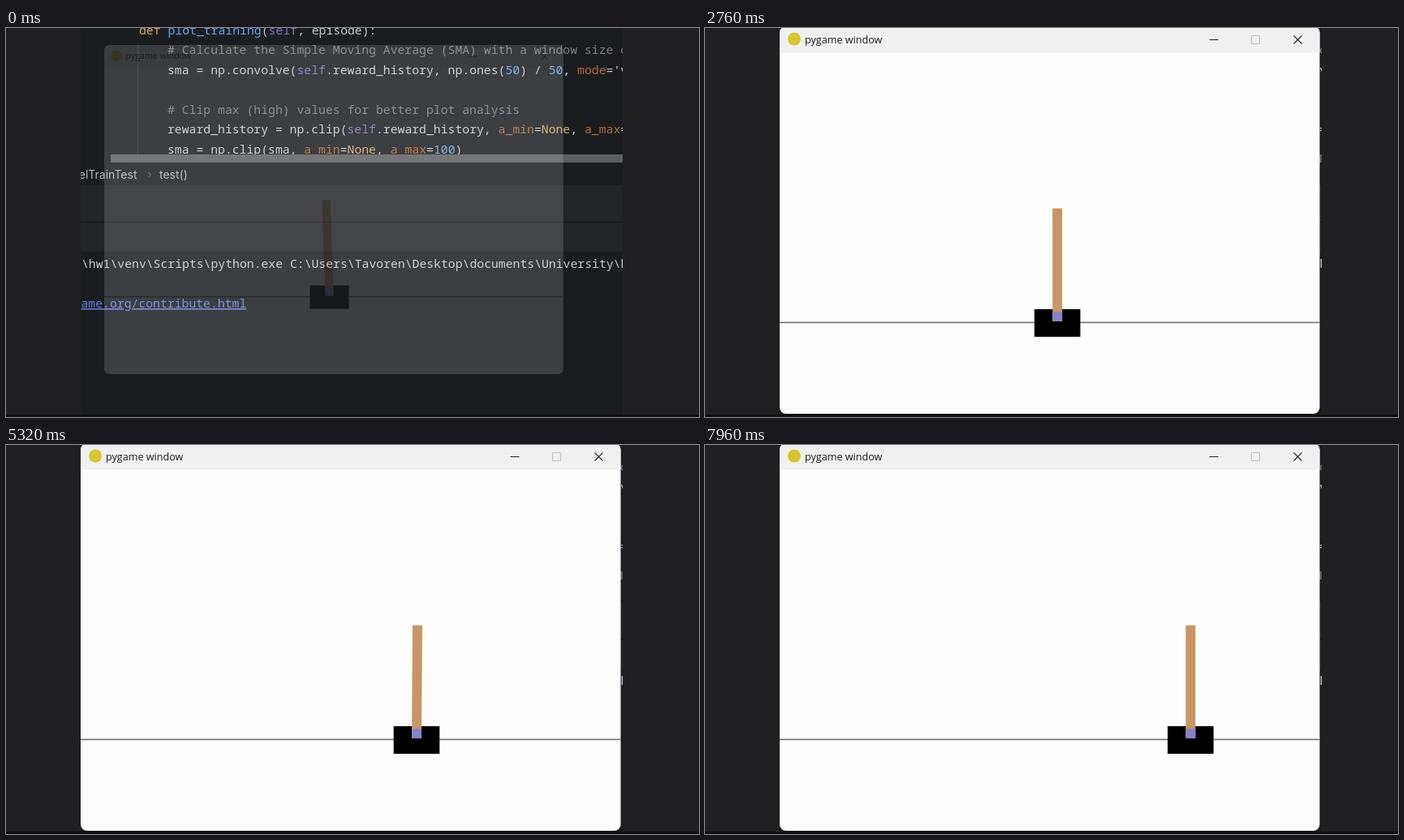
Recreate the animation shown at these times as an HTML page. Size 854x480 px, loop 8 s.

```html
<!DOCTYPE html>
<html lang="en">
<head>
<meta charset="utf-8">
<title>Cart and pole</title>
<style>
  html, body { margin: 0; width: 100%; height: 100%; overflow: hidden; background: #202022; }
  svg { display: block; width: 854px; height: 480px; }
  text { white-space: pre; }
  .code { font: 14.78px "Noto Sans Mono", "DejaVu Sans Mono", monospace; fill: #c6cad0; }
  .crumb { font: 14px Inter, sans-serif; fill: #b4b7bc; }
  .title { font: 12.6px "Open Sans", "Noto Sans", sans-serif; fill: #1c1c1c; }
  .keyword { fill: #d6a96a; }
  .name { fill: #6aa5e8; }
  .self { fill: #8a70b8; }
  .arg { fill: #b56c32; }
  .number { fill: #78a8dc; }
  .comment { fill: #7a7e85; }
  .link { fill: #6685dd; text-decoration: underline; }
</style>
</head>
<body>
<svg viewBox="0 0 854 480">
  <defs>
    <clipPath id="screen"><rect x="92" width="668" height="480"/></clipPath>
    <clipPath id="frame"><rect x="92" y="-2" width="665.5" height="478" rx="8"/></clipPath>
  </defs>
  <rect width="854" height="480" fill="#202022"/>

  <g clip-path="url(#screen)">
    <rect x="92" width="668" height="480" fill="#191d20"/>
    <rect x="92" y="194" width="668" height="82" fill="#222427"/>
    <rect x="92" y="239" width="668" height="1" fill="#101214"/>
    <rect x="162" y="18" width="1" height="138" fill="#39302b"/>
    <g class="code">
      <text x="164" y="7.5"><tspan class="keyword">def </tspan><tspan class="name">plot_training</tspan>(<tspan class="self">self</tspan>, episode):</text>
      <text x="199" y="32" class="comment"># Calculate the Simple Moving Average (SMA) with a window size of 50</text>
      <text x="199" y="56.5">sma = np.convolve(<tspan class="self">self</tspan>.reward_history, np.ones(<tspan class="number">50</tspan>) / <tspan class="number">50</tspan>, <tspan class="arg">mode</tspan>='valid')</text>
      <text x="199" y="105.5" class="comment"># Clip max (high) values for better plot analysis</text>
      <text x="199" y="130">reward_history = np.clip(<tspan class="self">self</tspan>.reward_history, <tspan class="arg">a_min</tspan>=<tspan class="keyword">None</tspan>, <tspan class="arg">a_max</tspan>=<tspan class="number">100</tspan>)</text>
      <text x="199" y="154.5">sma = np.clip(sma, <tspan class="arg">a_min</tspan>=<tspan class="keyword">None</tspan>, <tspan class="arg">a_max</tspan>=<tspan class="number">100</tspan>)</text>
      <text x="93" y="296">\hw1\venv\Scripts\python.exe C:\Users\Tavoren\Desktop\documents\University\hw1</text>
      <text x="92.5" y="345" class="link">ame.org/contribute.html</text>
    </g>
    <rect x="129" y="156" width="631" height="10" fill="#5c5e60"/>
    <g class="crumb">
      <text x="161.5" y="186" text-anchor="end">elTrainTest</text>
      <text x="189" y="186">test()</text>
      <path d="M175.5 178l3 3-3 3" fill="none" stroke="#777a7f"/>
    </g>
  </g>
  <rect y="477" width="854" height="3" fill="#120d12"/>

  <g id="window">
    <g clip-path="url(#frame)">
      <rect x="92" y="-2" width="666" height="478" fill="#fdfdfd"/>
      <rect x="92" y="-2" width="666" height="32.5" fill="#f0f0f0"/>
      <rect x="92" y="362.6" width="666" height="1.6" fill="#707070"/>
    </g>
    <circle cx="110" cy="13.5" r="8" fill="#d9c52c"/>
    <text x="123" y="18.5" class="title">pygame window</text>
    <g fill="none" stroke="#222" stroke-width="1.1">
      <path d="M621.5 14.5h11M725.5 9.5l10 10m0-10l-10 10"/>
      <rect x="673.5" y="9.5" width="10" height="10" rx="1" stroke="#c4c4c4"/>
    </g>
    <g id="cart">
      <rect x="-28.3" y="347" width="56.6" height="34"/>
      <polygon id="pole" fill="#c89664"/>
      <rect x="-6" y="350" width="12" height="12" rx="3.5" fill="#8484cb"/>
    </g>
  </g>
</svg>
<script>
const LOOP = 8000, STEP = 40;
const find = id => document.getElementById(id);
const windowGroup = find("window"), cart = find("cart"), pole = find("pole");

// [time, cart centre]
const cartKeys = [[0, 418.5], [300, 415], [600, 412], [840, 411.6], [1680, 418.7],
  [2520, 428], [2760, 434.2], [3360, 450.5], [3840, 464], [4200, 473.7], [5040, 499],
  [5320, 506], [5880, 524.5], [6480, 544], [6720, 553], [7560, 584], [7960, 598.4]];
// [time, sideways offset of the pole's tip]
const tipKeys = [[0, -4.7], [300, -1.5], [600, 2], [1100, 1], [2760, 0], [3840, 0],
  [4600, 0.6], [5320, 1], [6480, 1], [7400, 0.4], [7960, 0]];

function sample(keys, time) {
  let i = keys.findIndex(key => key[0] > time);
  if (i < 0) return keys[keys.length - 1][1];
  const [t0, v0] = keys[i - 1], [t1, v1] = keys[i];
  return v0 + (v1 - v0) * (time - t0) / (t1 - t0);
}

function draw(time) {
  const opened = 1 - (1 - Math.min(time / 280, 1)) ** 3;
  const mix = (from, to) => from + (to - from) * opened;
  const scale = mix(0.85, 1);
  windowGroup.setAttribute("transform",
    `translate(${mix(121, 92)} ${mix(21, -2)}) scale(${scale}) translate(-92 2)`);
  windowGroup.setAttribute("opacity", Math.min(1, 0.15 + 0.85 * time / 160));

  const tip = sample(tipKeys, time), tilt = tip * 6 / 139;
  cart.setAttribute("transform", `translate(${sample(cartKeys, time)} 0)`);
  pole.setAttribute("points",
    `-6,${362 - tilt} ${tip - 6},${222.5 - tilt} ${tip + 6},${222.5 + tilt} 6,${362 + tilt}`);
}

const start = performance.now();
function tick() {
  const time = (performance.now() - start) % LOOP;
  draw(Math.floor(time / STEP) * STEP);
  requestAnimationFrame(tick);
}
tick();
</script>
</body>
</html>
```
